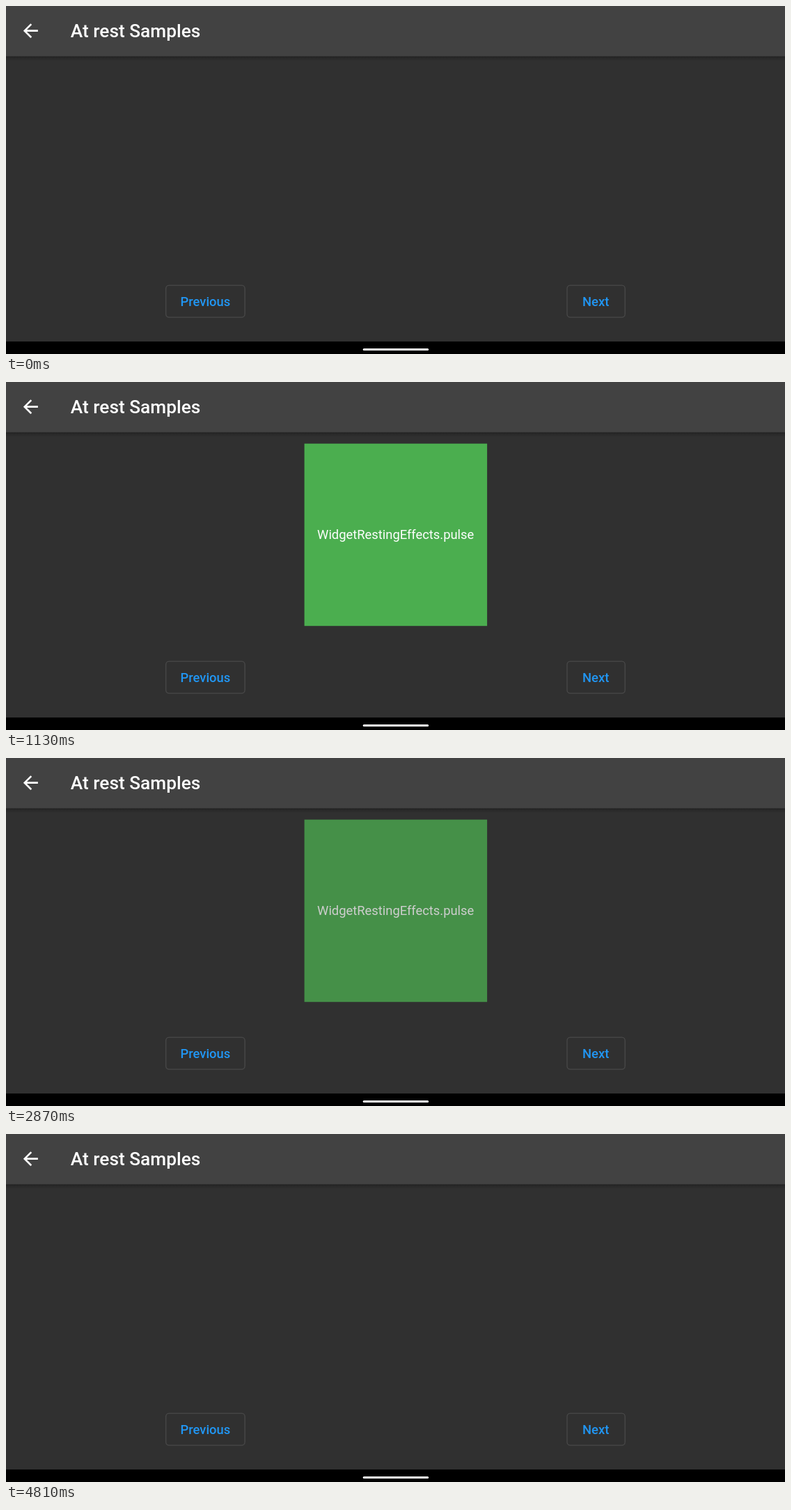
An HTML page that plays this animation: 1119x501 px, repeating every 4850 ms.

```html
<!DOCTYPE html>
<html lang="en">
<head>
<meta charset="utf-8">
<title>At rest Samples</title>
<style>
  html, body { margin: 0; width: 100%; height: 100%; overflow: hidden; background: #303030; }
  svg { display: block; width: 1119px; height: 501px; }
  text { font: 400 18.375px Roboto, sans-serif; fill: #fff; }
  .title { font-size: 26.25px; font-weight: 500; }
  .mid { text-anchor: middle; }
  .button text { font-weight: 500; fill: #2196f3; }
  .button rect { fill: none; stroke: #494949; stroke-width: 1.3; }
  #pulse { opacity: 0; }
</style>
</head>
<body>
<svg viewBox="0 0 1119 501">
  <defs>
    <linearGradient id="shadow" x2="0" y2="1">
      <stop offset="0" stop-opacity=".38"/>
      <stop offset=".4" stop-opacity=".16"/>
      <stop offset="1" stop-opacity="0"/>
    </linearGradient>
  </defs>
  <rect width="1119" height="501" fill="#303030"/>
  <rect y="72" width="1119" height="7" fill="url(#shadow)"/>
  <rect width="1119" height="72.5" fill="#424242"/>
  <path transform="translate(19.6 19.9) scale(1.3125)" fill="#fff"
    d="M20 11H7.83l5.59-5.59L12 4l-8 8 8 8 1.41-1.41L7.83 13H20z"/>
  <text class="title" x="92.8" y="45.2">At rest Samples</text>

  <g id="pulse">
    <rect x="428.6" y="88.7" width="262.5" height="262.5" fill="#4caf50"/>
    <text class="mid" x="559.7" y="226.4">WidgetRestingEffects.pulse</text>
  </g>

  <g class="button">
    <rect x="229.7" y="402.2" width="113.4" height="46" rx="4.6"/>
    <text class="mid" x="286.4" y="431.8">Previous</text>
  </g>
  <g class="button">
    <rect x="806" y="402.2" width="83.2" height="46" rx="4.6"/>
    <text class="mid" x="847.2" y="431.8">Next</text>
  </g>

  <rect y="483" width="1119" height="18" fill="#000"/>
  <rect x="512.7" y="492.9" width="94.4" height="3" rx="1.5" fill="#fff"/>
</svg>
<script>
  const LOOP = 4850;
  // [time in ms, opacity, easing towards the next step]
  const steps = [
    [0, 0, 'linear'],
    [70, 0, 'cubic-bezier(.2,.53,.4,1)'],
    [1124, 1, 'ease-in-out'],
    [2150, 0, 'linear'],
    [2500, 0, 'cubic-bezier(.17,.64,.3,1)'],
    [3650, 1, 'ease-in-out'],
    [4676, 0, 'linear'],
    [LOOP, 0, 'linear']
  ];
  document.getElementById('pulse').animate(
    steps.map(([time, opacity, easing]) => ({ offset: time / LOOP, opacity, easing })),
    { duration: LOOP, iterations: Infinity }
  );
</script>
</body>
</html>
```
